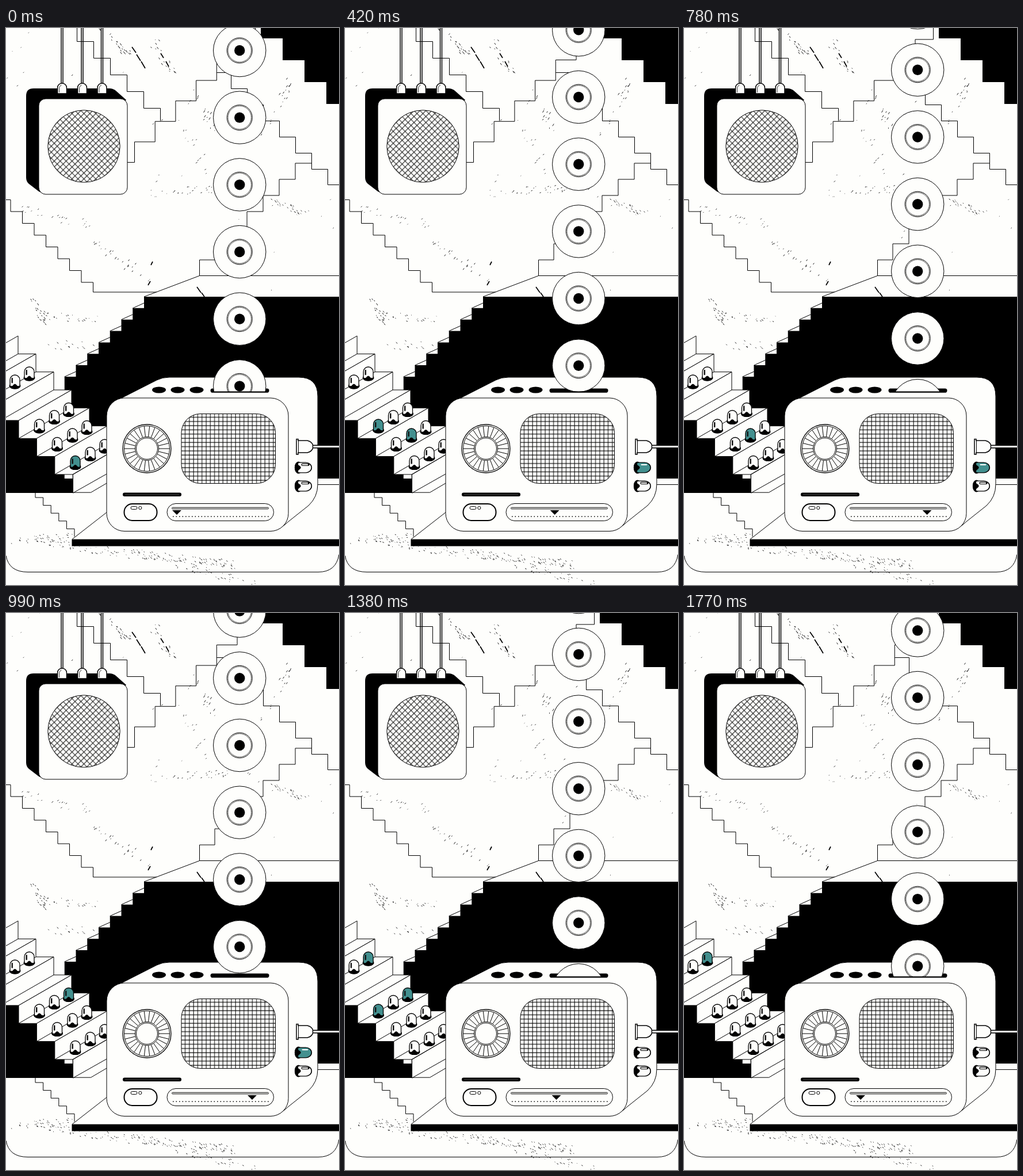
Recreate the animation shown at these times as an HTML page. Size 579 by 968 pixels, loop 1800 ms.

```html
<!DOCTYPE html>
<html lang="en">
<head>
<meta charset="utf-8">
<title>Record machine</title>
<style>
html, body { margin: 0; width: 100%; height: 100%; overflow: hidden; background: #fefefc; }
svg { display: block; }
.w { fill: #fefefc; stroke: #000; }
.l { fill: none; stroke: #000; }
.glass { fill: #fefefc; }
.on .glass { fill: #43908f; }
.shine { fill: none; stroke: #111; stroke-width: 2.4; stroke-linecap: round; }
.side .shine { stroke: #fefefc; stroke-width: 2; }
.side:not(.on) .edge { stroke: #000; stroke-width: 4; stroke-linecap: round; }
</style>
</head>
<body>
<svg width="579" height="968" viewBox="0 0 579 968">
  <defs>
    <pattern id="mesh" width="7.3" height="7.3" patternUnits="userSpaceOnUse" patternTransform="translate(135.5 205.5) rotate(45)">
      <path d="M0 3.6H7.3M3.6 0V7.3" class="l"/>
    </pattern>
    <pattern id="grid" x="305" y="670" width="7.3" height="7.3" patternUnits="userSpaceOnUse">
      <path d="M0 6.5H7.3M6.5 0V7.3" class="l"/>
    </pattern>
    <clipPath id="aboveSlot"><path d="M0 0H579V632H0Z"/></clipPath>
    <g id="disc">
      <circle r="45.7" class="w"/>
      <circle r="22" class="l"/>
      <circle r="20.3" class="l" stroke-width=".7"/>
      <circle r="9.2"/>
    </g>
    <g id="cable">
      <path d="M-1.5 0V97M1.5 0V97" class="l" stroke-width="1.5"/>
      <path d="M-8 114V104a8 8 0 0 1 16 0V114Z" class="w" stroke-width="1.5"/>
      <path d="M-5 112V104Q-4 100 -1 99" class="l" stroke-width=".8"/>
    </g>
  </defs>

  <!-- wall -->
  <path id="specks" class="l" stroke-width=".9"/>
  <path id="marks" class="l" stroke-width="1.7"/>
  <path id="outlines" class="l"/>
  <path d="M240 467L336.5 430.5H579M0 917Q5 945.5 38 945.5H543Q574 945.5 579 915" class="l"/>
  <path id="shadows"/>
  <path id="ledges" class="l"/>
  <path d="M117 808L175 775V841L115 889H579V783H175" fill="#fefefc"/>
  <path d="M117 808L175 775M176 841L115 888.5M541 793.5H579" class="l"/>
  <path d="M114.5 888.5H579V900.5H114.5Z"/>

  <g id="stairs"></g>
  <g id="lamps"></g>

  <!-- hanging speaker -->
  <path d="M35 118Q35 105 48 105H180Q186 105 191 109L209 125L66 287Q61 287 57 284L40 271Q35 267 35 260Z"/>
  <rect x="57" y="123" width="154" height="166" rx="12" class="w"/>
  <circle cx="135.5" cy="205.5" r="62.7" fill="url(#mesh)" stroke="#000"/>
  <use href="#cable" x="97.5"/><use href="#cable" x="132.5"/><use href="#cable" x="167"/>

  <!-- radio -->
  <path class="w" d="M188 651Q196 645 205 641L262 612Q272 607 284 607H509Q542 607 542 640V793Q542 815 526 830L492 857Q474 874 460 874Z"/>
  <rect x="175" y="643" width="316" height="231.5" rx="31" class="w"/>
  <ellipse cx="266" cy="629" rx="12" ry="5.5"/>
  <ellipse cx="298.5" cy="629" rx="12" ry="5.5"/>
  <ellipse cx="331.5" cy="629" rx="12" ry="5.5"/>
  <rect x="355.5" y="626.5" width="102" height="7" rx="3.5"/>
  <g transform="translate(245 731)" class="l">
    <circle r="42" stroke-width="1.3"/><circle r="39.5"/><circle r="20.5"/><circle r="18.5"/>
    <path id="spokes"/>
  </g>
  <rect x="305" y="670.5" width="163.5" height="121" rx="33" fill="url(#grid)" stroke="#000"/>
  <rect x="203" y="807.5" width="102" height="6.5" rx="3.2"/>
  <path d="M207 810.7H301" stroke="#444"/>
  <rect x="205.5" y="827" width="57" height="29" rx="14" class="w" stroke-width="2"/>
  <rect x="217" y="831.5" width="11" height="5" rx="2.5" class="l"/>
  <circle cx="233.3" cy="834" r="2.6" class="l"/>
  <rect x="280" y="826.5" width="185.5" height="30" rx="15" class="w"/>
  <rect x="288.5" y="833.3" width="168" height="2.5" rx="1.2" class="l"/>
  <path d="M290 849H457" class="l" stroke-width="1.6" stroke-dasharray="1.6 3.9"/>
  <path id="pointer" d="M-8 838H8L0 846Z"/>
  <path d="M533 727.5H579" stroke="#000" stroke-width="6"/>
  <path d="M533 727.5H579" stroke="#fefefc" stroke-width="3"/>
  <path d="M505 714.5H508V717H524Q532 719 533.5 725V730Q532 736 524 738H508V741H505Z" class="w" stroke-width="1.5"/>
  <path d="M508.5 717V738" class="l"/>
  <g id="sideLamps"></g>

  <!-- records -->
  <g clip-path="url(#aboveSlot)"><g id="discs"></g></g>
  <path d="M357 632.5H456" stroke="#000" stroke-width="2"/>
</svg>
<script>
const el = id => document.getElementById(id);
const path = (id, d) => el(id).setAttribute('d', d);
const range = (n, f) => Array.from({ length: n }, (_, i) => f(i)).join('');

path('outlines',
  'M123.5 -5.5' + 'v29h29'.repeat(5) + 'v22' +
  'M211 233.5h12.5' + 'v-35.6h35.7'.repeat(5) + 'v-35.6h31.5v-20' +
  'M366 77.5h25.5' + 'v28h28'.repeat(6) + 'v27h20' +
  'M531 235' + 'h-28v28'.repeat(6) + 'h-26.5v27.5' +
  'M0 298.5h8' + 'v20.5h20.5'.repeat(7) + 'v17h110' +
  'M51 808v8' + 'h13.6v13.6'.repeat(5));
path('shadows',
  'M443 0v18' + 'h38v38'.repeat(3) + 'H579V0Z' +
  'M579 467H240' + 'v19.85h-19.75'.repeat(7) + 'V783H579Z' +
  'M0 682h22' + 'v31.3h31.5'.repeat(3) + 'V808H0Z');
path('ledges', range(7, i => `M${101.8 + i * 19.75} ${606 - i * 19.85}l20 -9`));
path('spokes', range(26, i => {
  const a = i * Math.PI / 13, c = Math.cos(a), s = Math.sin(a);
  return `M${21 * c} ${21 * s}L${39 * c} ${39 * s}`;
}));

// Each step is a riser and a tread sharing one crease
el('stairs').innerHTML = range(7, n => {
  const i = n - 3, fx = 22 + 31.4 * i, fy = 682 + 31.3 * i, bx = 114 + 31 * i, by = 629 + 31.3 * i;
  return `<path class="w" d="M${fx} ${fy}L${bx} ${by}v31.3h31L${fx + 31.4} ${fy + 31.3}h-31.4ZM${fx} ${fy + 31.3}L${bx} ${by + 31.3}"/>`;
}) + '<path class="w" d="M116.5 776L207 723V757L116.5 808Z"/>';

// Plaster scratches: x, y, length across and down, count, tick slope
let seed = 7;
const rnd = () => (seed = seed * 16807 % 2147483647) / 2147483647;
const bands = [
  [165, 5, 50, 40, 22, 1.6], [255, 20, 35, 55, 20, 1.4], [330, 110, 30, 70, 14, -1.6],
  [295, 140, 50, 110, 14, -1], [445, 190, 50, -100, 22, -1.5], [250, 290, 150, -15, 36, -.4],
  [465, 300, 55, 25, 30, .9], [20, 315, 130, 30, 24, -1], [150, 370, 100, 70, 24, -1.5],
  [50, 470, 15, 40, 20, 1.5], [60, 500, 100, 5, 30, .5], [80, 550, 70, 0, 14, 1],
  [10, 890, 100, -5, 36, .3], [60, 890, 150, 25, 50, .5], [210, 912, 190, 20, 100, .8],
  [270, 925, 170, 43, 50, .6], [0, 0, 579, 420, 40, -1]
];
path('specks', bands.map(([x, y, dx, dy, n, slope]) => {
  const spread = dx > 500 ? 200 : 15;
  return range(n, () => {
    const k = rnd(), s = .5 + rnd() * 2;
    return `M${x + dx * k + (rnd() - .5) * spread} ${y + dy * k + (rnd() - .5) * spread}l${s} ${s * slope}`;
  });
}).join(''));
path('marks', 'M219 33l7 10M227 46l7 11M235 58l7 12M269 44l5 8M278 58l5 9M332 450l7 10M340 460l5 7M252 412l3 -6M247 447l4 -7M355 174h1');

// Lamps: x, base y, then lit spans in ms
const stairLamps = [
  [15.5, 627], [40.5, 613, 1380, 1800], [58, 704, 150, 690, 1020, 1680], [84, 688.5],
  [109, 675.5, 990, 1680], [89, 735.5], [115.5, 720, 420, 990], [140.5, 706.5],
  [120.5, 767.5, 0, 420], [146.5, 752.5], [171.5, 739]
];
const sideLamps = [[502.5, 764, 420, 1140], [502.5, 796]];

const lampShape = `<ellipse cy="-5" rx="10" ry="5.5"/>
  <path class="glass" stroke="#000" stroke-width="1.3" d="M-8.5 -4V-15.5a8.5 8.5 0 0 1 17 0V-4Z"/>
  <path d="M-9.5 -6Q-5 -3 -3.5 -6Q0 -11 3.5 -6Q5 -3 9.5 -6Q9 .5 0 .5T-9.5 -6Z"/>
  <path class="edge" d="M-4.8 -19V-11"/><path class="shine" d="M-4.8 -18V-11"/>`;

function addLamps(group, list, cls, turn) {
  group.innerHTML = list.map(([x, y]) =>
    `<g class="${cls}" transform="translate(${x} ${y})${turn}">${lampShape}</g>`).join('');
  return list.map(([, , ...spans], i) => ({ node: group.children[i], spans }));
}
const lamps = [
  ...addLamps(el('lamps'), stairLamps, 'lamp', ''),
  ...addLamps(el('sideLamps'), sideLamps, 'side', ' rotate(90) scale(1.05 1.2)')
];

const LOOP = 1800, TICK = 30, GAP = 116.67;
el('discs').innerHTML = range(8, i => `<use href="#disc" x="406.2" y="${39 + (i - 2) * GAP}"/>`);

const isLit = (spans, t) => spans.some((start, i) => i % 2 === 0 && t >= start && t < spans[i + 1]);

function draw(t) {
  el('discs').setAttribute('transform', `translate(0 ${t * .1929 % GAP})`);
  const x = t < 900 ? 297 + t * .161 : 441.9 - (t - 900) * .155;
  el('pointer').setAttribute('transform', `translate(${x})`);
  for (const { node, spans } of lamps) node.classList.toggle('on', isLit(spans, t));
}

const begin = performance.now();
function frame() {
  const t = (performance.now() - begin) % LOOP;
  draw(Math.floor(t / TICK) * TICK);
  requestAnimationFrame(frame);
}
frame();
</script>
</body>
</html>
```
